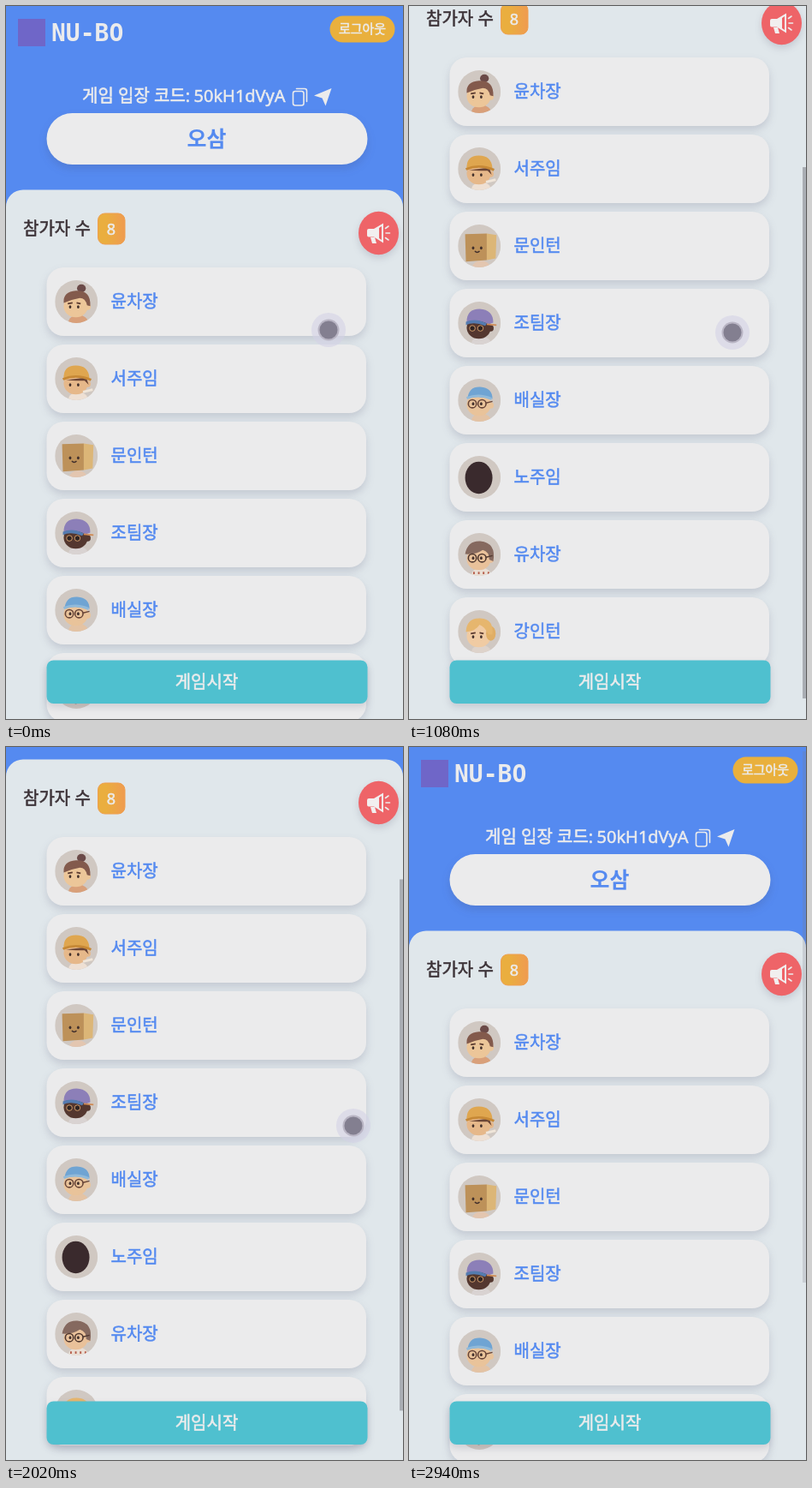
Recreate the animation shown at these times as an HTML page. Size 464 by 832 pixels, loop 3.07 s.

```html
<!DOCTYPE html>
<html lang="ko">
<head>
<meta charset="utf-8">
<title>게임 대기실</title>
<style>
  html, body { margin: 0; width: 100%; height: 100%; overflow: hidden; background: #e0e7eb; }
  svg { display: block; }
  text {
    font: 500 20px "Noto Sans", "Noto Sans CJK KR", "Noto Sans CJK", sans-serif;
    color: #ebebec; fill: currentColor; stroke: currentColor; stroke-width: .55;
  }
  .mid { text-anchor: middle; }
  .blue { color: #558af0; fill: #558af0; }
  .dark { color: #3d3338; }
  .room { font-size: 25px; font-weight: 700; stroke: none; }
  .title { font: bold 28px "DejaVu Sans Mono", monospace; stroke: none; }
  .card { fill: #ebebec; filter: drop-shadow(0 5px 5px rgba(60, 60, 95, .17)); }
  .lift { filter: drop-shadow(0 4px 4px rgba(50, 50, 80, .16)); }
  .line { fill: none; stroke: #ebebec; stroke-width: 1.6; stroke-linecap: round; stroke-linejoin: round; }
</style>
</head>
<body>
<svg width="464" height="832" viewBox="0 0 464 832">
  <defs>
    <linearGradient id="amber">
      <stop offset=".3" stop-color="#eaae3f"/>
      <stop offset="1" stop-color="#ef9b50"/>
    </linearGradient>
    <clipPath id="round"><circle cx="25" cy="25" r="25"/></clipPath>
  </defs>
  <g id="page">
    <rect class="blue" width="464" height="300"/>
    <rect x="14" y="15" width="32" height="32" fill="#6f66c8"/>
    <text class="title" x="53" y="41">NU-BO</text>

    <rect x="378.5" y="11.5" width="76" height="31" rx="15.5" fill="#e9b03d"/>
    <text class="mid" x="416.5" y="31.5" style="font-size:15px">로그아웃</text>

    <text x="89" y="111.5">게임 입장 코드: <tspan x="219.5">50kH1dVyA</tspan></text>
    <path class="line" d="M339.5 96.5H349a2.5 2.5 0 0 1 2.5 2.5V111.5M338 99.5h7.5a2.5 2.5 0 0 1 2.5 2.5V113.5a2.5 2.5 0 0 1-2.5 2.5H338a2.5 2.5 0 0 1-2.5-2.5V102a2.5 2.5 0 0 1 2.5-2.5z"/>
    <path fill="#ebebec" d="M380.5 96L373.5 116.5L369.5 107.5L360 104.5Z"/>

    <rect class="card" x="47.5" y="125" width="375" height="60" rx="30"/>
    <text class="mid blue room" x="234.5" y="164">오삼</text>

    <path fill="#e0e7eb" d="M0 1120V234.500a20 20 0 0 1 20-20H444a20 20 0 0 1 20 20V1120z"/>
    <text class="dark" x="20" y="267">참가자 수</text>
    <rect x="107.500" y="242" width="31.500" height="36" rx="8" fill="url(#amber)" stroke="#ee9f50"/>
    <text class="mid" x="123" y="266.500" style="font-size:18px">8</text>

    <g id="cards"></g>

    <ellipse class="lift" cx="435.500" cy="265" rx="23.500" ry="25.200" fill="#ee6468"/>
    <path fill="#f2efef" d="M424 260H430L441 253.500V276.500L430 269.500H424a2 2 0 0 1-2-2V262a2 2 0 0 1 2-2zM426 270H431L433 277H428z"/>
    <path fill="#ee6468" d="M436 259L439 257V273L436 271z"/>
    <path class="line" d="M443.500 259.500L447 257M444 265H448.500M443.500 270.500L447 273"/>
  </g>

  <rect class="lift" x="47.500" y="763.500" width="375" height="50.500" rx="8" fill="#4fc0cf"/>
  <text class="mid" x="234.500" y="796">게임시작</text>

  <rect id="bar" x="460" width="4" height="620" fill="#77777f"/>
  <g id="dot">
    <circle r="20" fill="#d4d2e6" opacity=".6"/>
    <circle r="12.500" fill="#b9b5c4"/>
    <circle r="10.500" fill="#837f90"/>
  </g>
</svg>
<script>
const el = id => document.getElementById(id);

// Avatar parts, in a 50 x 50 box
const disc = (x, y, rx, ry, fill) => `<ellipse cx="${x}" cy="${y}" rx="${rx}" ry="${ry}" fill="${fill}"/>`;
const shape = (d, fill) => `<path d="${d}" fill="${fill}"/>`;
const stroke = (d, color, w = 1.5) => `<path d="${d}" fill="none" stroke="${color}" stroke-width="${w}"/>`;
const eyes = (y = 32, color = '#42302c') => disc(17, y, 1.5, 2, color) + disc(27, y, 1.5, 2, color);
const glasses = color =>
  `<g fill="none" stroke="${color}" stroke-width="1.7"><circle cx="16" cy="30" r="5"/><circle cx="28" cy="30" r="5"/></g>` +
  stroke('M33 29L41 27', color);
const head = (skin, shirt) =>
  disc(27, 51, 12, 9, shirt) + disc(39, 32, 3.5, 4, skin) + disc(24, 31, 15, 14, skin);
const brows = stroke('M14 28L20 27M25 27L30 28', '#5c3b30', 2);

const people = [
  ['윤차장', head('#ecc699', '#d9a07a') + disc(31, 9, 5.5, 5, '#6b4a48') +
    shape('M9 27Q8 13 24 12Q43 11 42 31L38 30Q36 21 29 21Q18 23 9 27z', '#835a4c') + brows + eyes()],
  ['서주임', head('#e6b88a', '#eee0d4') + shape('M12 27L37 24L40 33L35 28L24 28z', '#6b4636') +
    shape('M9 26Q8 9 24 9Q40 9 41 25Q26 20 9 26z', '#dfa64f') +
    stroke('M8 26Q25 19 43 27', '#c78936', 3) + eyes(33) + stroke('M33 42L45 39', '#f0e6da', 3)],
  ['문인턴', disc(27, 52, 11, 8, '#e3c6b0') + shape('M7 11L34 10L34 43L8 45z', '#bd9159') +
    shape('M34 10L46 12L45 41L34 43z', '#dcb677') + eyes(28) + stroke('M19 32Q22 35 25 32', '#42302c')],
  ['조팀장', head('#54372f', '#d9d3d2') + shape('M9 24Q9 8 25 8Q42 9 42 25L36 27Q23 20 9 24z', '#8c7fb8') +
    shape('M8 24Q20 19 34 26L32 29Q18 23 8 28z', '#547bb0') +
    stroke('M34 27L46 28', '#cf8b55', 2) +
    '<g fill="#2f2423" stroke="#d8a06c"><circle cx="16" cy="32" r="3.5"/><circle cx="26" cy="32" r="3.5"/></g>'],
  ['배실장', head('#e9c39a', '#e4c3a4') + shape('M10 23Q12 8 26 9Q41 10 41 24Q26 19 10 23z', '#6fa4d3') +
    stroke('M9 23Q24 17 40 24', '#91bada', 3) + glasses('#684538') + eyes(30)],
  ['노주임', disc(24, 26, 17, 20, '#3a2a2d')],
  ['유차장', head('#e9c19a', '#eadfd5') + stroke('M18 47V50M24 47V50M30 47V50M36 47V50', '#b65e4b', 2) +
    shape('M7 25Q10 8 26 9Q46 11 42 34L37 32Q37 22 29 20Q20 26 7 25z', '#85695f') + glasses('#50382f') + eyes(30)],
  ['강인턴', head('#f0cba3', '#ded3cb') + disc(39, 28, 6, 9, '#e0ae65') +
    shape('M8 26Q9 8 26 9Q43 10 41 29L36 29Q32 20 25 17Q20 25 8 26z', '#e6b66e') + brows + eyes()],
];

el('cards').innerHTML = people.map(([name, art], i) => `
  <g transform="translate(47.5 ${305 + 90 * i})">
    <rect class="card" width="373.5" height="80" rx="20"/>
    <g transform="translate(9.7 15)" clip-path="url(#round)">
      <rect width="50" height="50" fill="#d0c8c2"/>
      <g transform="translate(1.8 1) scale(.94)">${art}</g>
    </g>
    <text class="blue" x="75" y="47">${name}</text>
  </g>`).join('');

const loop = 3070;
const ticks = [0, 70, 200, 330, 400, 530, 600, 730, 800, 870, 940, 1010, 1080, 1210, 1280, 1350,
  1420, 1550, 1620, 1690, 1820, 1950, 2020, 2150, 2220, 2350, 2480, 2680, 2810, 2940];
const scroll = [[0, 0], [730, 0], [800, 5], [870, 32], [940, 89], [1010, 168], [1080, 245], [1210, 257],
  [1350, 261], [1690, 261], [1820, 254], [1950, 228], [2220, 120], [2350, 22], [2480, 0]];
const pointer = [[0, 377, 378], [600, 379, 358], [940, 377, 364], [1080, 378, 381],
  [1550, 380, 404], [2220, 417, 458], [2480, 425, 472]];
const barFade = [[0, 0], [730, 0], [870, .5], [2680, .5], [2940, .22]];

function at(track, t) {
  const next = track.findIndex(key => key[0] > t);
  if (next < 0) return track[track.length - 1].slice(1);
  const a = track[next - 1], b = track[next];
  const k = (t - a[0]) / (b[0] - a[0]);
  return a.slice(1).map((v, i) => v + (b[i + 1] - v) * k);
}

function draw(ms) {
  const t = ticks.filter(tick => tick <= ms).pop();
  const [y] = at(scroll, t);
  el('page').setAttribute('transform', `translate(0 ${-Math.round(y)})`);
  el('bar').setAttribute('y', 5 + y * .747);
  el('bar').setAttribute('opacity', at(barFade, t)[0]);
  el('dot').setAttribute('transform', `translate(${at(pointer, t).join(' ')})`);
  el('dot').setAttribute('opacity', t < 2680 ? 1 : 0);
}

let start;
function frame(now) {
  start ??= now;
  draw((now - start) % loop);
  requestAnimationFrame(frame);
}
draw(0);
requestAnimationFrame(frame);
</script>
</body>
</html>
```
